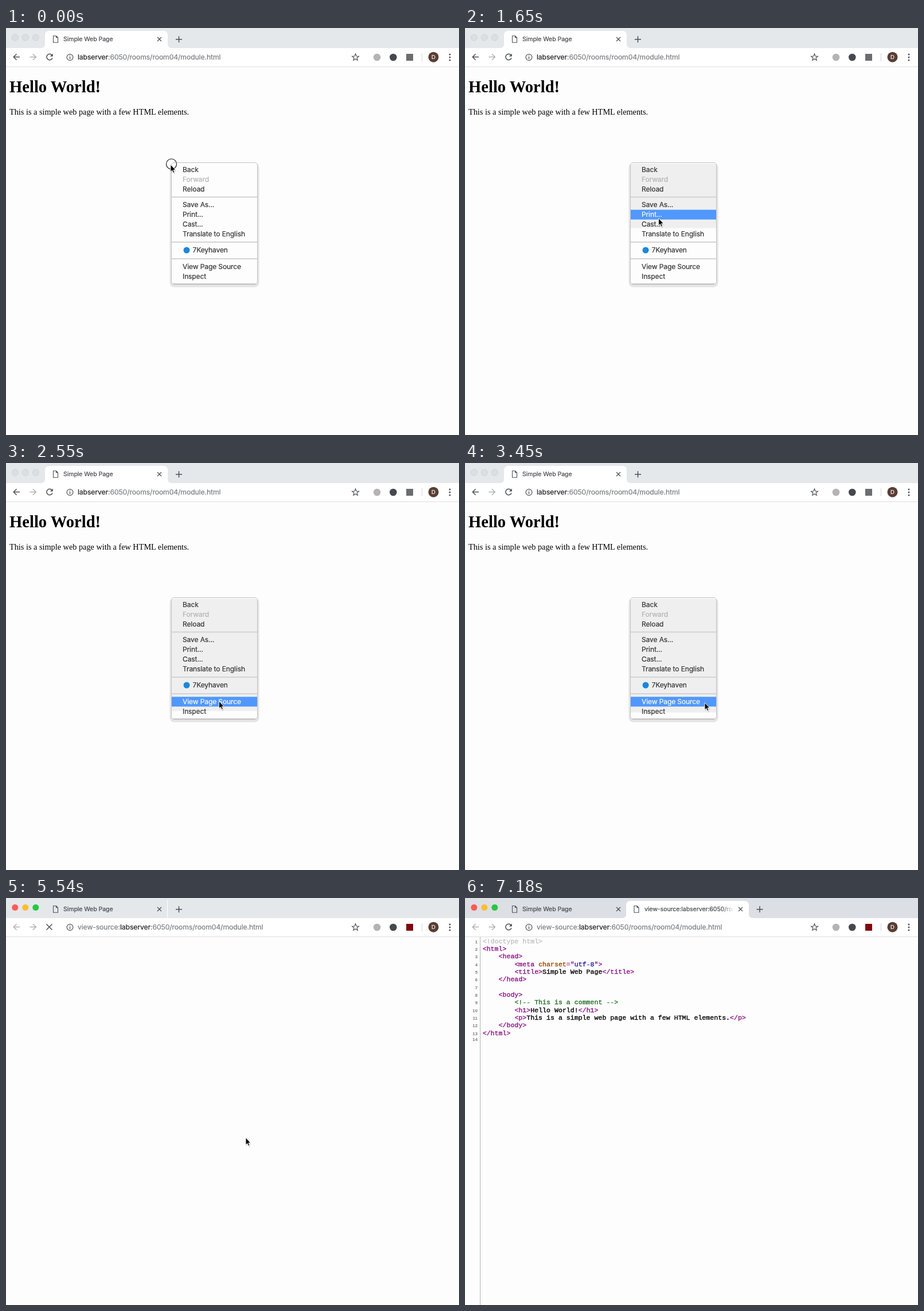
An HTML page that plays this animation: 790 px wide and 709 px high, repeating every 7.78 s.

```html
<!DOCTYPE html>
<html lang="en">
<head>
<meta charset="utf-8">
<title>Viewing the markup of a page</title>
<style>
  html, body { margin: 0; width: 100%; height: 100%; overflow: hidden; background: #fdfdfd; }
  svg { display: block; }
  text { white-space: pre; fill: currentColor; }
  tspan { fill: currentColor; stroke: currentColor; }
  .ui, .code { stroke: currentColor; stroke-width: .2px; }
  .ui { font: 12px Inter, Roboto, sans-serif; letter-spacing: -.008em; color: #333; }
  .tab { font-size: 10.6px; color: #45494d; }
  .url { font-size: 12.2px; color: #777d82; }
  .host { color: #202124; }
  .serif { font-family: "Liberation Serif", serif; }
  .code { font: 11.6px "Liberation Mono", monospace; color: #000; stroke-width: .35px; }
  .num { font: bold 8px "Liberation Sans", sans-serif; color: #808080; text-anchor: end; }
  .line { fill: none; stroke: #4d5156; stroke-width: 1.5; }
  .doctype { color: #c0c0c0; }
  .tag { color: #881280; }
  .attr { color: #994500; }
  .value { color: #1a1aa6; }
  .comment { color: #236e25; }
</style>
</head>
<body>
<svg width="790" height="709" viewBox="0 0 790 709">
  <defs>
    <path id="tab" d="M-7 35Q0 35 0 28V13Q0 5 8 5H206Q214 5 214 13V28Q214 35 221 35Z" fill="#fff"/>
    <path id="file" class="line" style="stroke-width:1.1" d="M.5 .5H5.5L8.5 3.5V12H.5ZM5.5 .5V3.5H8.5"/>
    <path id="close" class="line" style="stroke-width:1.3" d="M-3.5 -3.5L3.5 3.5M3.5 -3.5L-3.5 3.5"/>
    <path id="arrow" class="line" d="M5.5 0H-5M0 -5.3L-5.3 0L0 5.3"/>
    <linearGradient id="fade">
      <stop offset="0" stop-color="#fff" stop-opacity="0"/>
      <stop offset="1" stop-color="#fff"/>
    </linearGradient>
    <clipPath id="title"><path d="M310 8H469V32H310Z"/></clipPath>
  </defs>

  <rect width="790" height="709" fill="#fdfdfd"/>
  <rect id="strip" width="790" height="35"/>
  <rect y="35" width="790" height="32" fill="#fff"/>
  <rect y="67" width="790" height="1" fill="#dcdddf"/>
  <g id="lights"></g>

  <use id="firstTab" href="#tab" x="68"/>
  <use href="#file" x="82" y="13.3"/>
  <text class="ui tab" x="100" y="23.3">Simple Web Page</text>
  <use href="#close" x="267.5" y="19.5"/>
  <path id="divider" d="M281.5 4V35" stroke="#fff"/>
  <g id="secondTab">
    <use href="#tab" x="281"/>
    <use href="#file" x="294.5" y="13.3"/>
    <g clip-path="url(#title)">
      <text class="ui tab" x="313" y="23.3">view-source:labserver:6050/rooms</text>
      <rect x="448" y="8" width="21" height="24" fill="url(#fade)"/>
    </g>
    <use href="#close" x="480.5" y="19.5"/>
  </g>
  <path id="plus" class="line" d="M-5.5 0H5.5M0 -5.5V5.5"/>

  <use id="back" href="#arrow" x="18.5" y="50.5"/>
  <use href="#arrow" transform="translate(47 50.5) scale(-1 1)" opacity=".45"/>
  <g id="reload">
    <path class="line" d="M80.2 47.2A5.2 5.2 0 1 0 81 52.2"/>
    <path d="M81.8 44.5V49.5H76.8Z" fill="#4d5156"/>
  </g>
  <path id="stop" class="line" d="M70.5 45.5L80.5 55.5M80.5 45.5L70.5 55.5"/>
  <circle class="line" style="stroke-width:1.2" cx="111.5" cy="51" r="5.4"/>
  <path class="line" style="stroke-width:1.3" d="M111.5 50V54M111.5 47.7V49"/>
  <text class="ui url" y="55.2" x="125"><tspan id="scheme"></tspan><tspan class="host">labserver</tspan>:6050/rooms/room04/module.html</text>
  <path id="star" class="line" style="stroke-width:1.2"/>
  <circle cx="647" cy="51" r="6.3" fill="#b4b4b4"/>
  <circle cx="675.3" cy="51" r="6.3" fill="#45494d"/>
  <rect id="badge" x="698" y="45" width="12" height="12"/>
  <path d="M725.5 44V58" stroke="#d5d7da"/>
  <circle cx="745.5" cy="50.7" r="9" fill="#5a3d33"/>
  <text class="ui" x="745.5" y="54.2" text-anchor="middle" style="font-size:9.5px;color:#fff">D</text>
  <path d="M774 46v0M774 51v0M774 56v0" stroke="#4d5156" stroke-width="3" stroke-linecap="round"/>

  <g id="page" class="serif">
    <text x="6" y="112" font-size="28.6" font-weight="bold">Hello World!</text>
    <text x="6" y="151" font-size="14.29">This is a simple web page with a few HTML elements.</text>
  </g>
  <g id="markup"></g>

  <g id="menu">
    <rect x="285.5" y="235" width="156" height="216.5" rx="8" fill="#e4e4e4"/>
    <rect x="288.5" y="234.5" width="150" height="211.5" rx="4.5" fill="#fdfdfd" stroke="#c2c2c2"/>
    <path d="M292 446H435" stroke="#a8a8a8"/>
    <rect id="shade" x="289" y="236.5" width="149" fill="#efefef"/>
    <path d="M289 294.5H438M289 373H438M289 402H438" stroke="#d4d4d4" stroke-width="1.8"/>
    <rect id="bar" x="289" width="149" height="17" fill="#5198fc"/>
    <circle cx="315" cy="387" r="5.5" fill="#1c87dc"/>
    <g id="items"></g>
  </g>

  <g id="ring" fill="none">
    <circle r="9" stroke="#fff" stroke-width="2.6" opacity=".6"/>
    <circle r="9" stroke="#111" stroke-width="1.1"/>
  </g>
  <g id="cursor">
    <path d="M1 2V15L4 12.5L6 17L8 16L6 11.8H10Z" fill="#000" opacity=".15"/>
    <path d="M0 0V12.6L2.9 10L4.8 14.5L6.9 13.6L5 9.2H8.8Z" stroke="#fff" stroke-width=".9"/>
  </g>
</svg>

<script>
const $ = id => document.getElementById(id);
const show = (id, on) => $(id).style.display = on ? "" : "none";
const move = (id, x, y) => $(id).setAttribute("transform", `translate(${x} ${y})`);
const span = (cls, s) => `<tspan class="${cls}">${s.replace(/</g, "&lt;")}</tspan>`;
const tag = s => span("tag", s);

// Context menu: label and vertical middle of each row
const items = [
  ["Back", 246.5], ["Forward", 263.5], ["Reload", 280.5],
  ["Save As...", 308], ["Print...", 325], ["Cast...", 342], ["Translate to English", 358.8],
  ["7Keyhaven", 387], ["View Page Source", 415.7], ["Inspect", 432.7]
];
$("items").innerHTML = items.map(([label, y]) =>
  `<text class="ui" x="${label[0] === "7" ? 325.5 : 308}" y="${y + 4.3}">${label}</text>`).join("");
const labels = [...$("items").children];

// Listing: indent and content of each line
const lines = [
  [0, span("doctype", "<!doctype html>")],
  [0, tag("<html>")],
  [4, tag("<head>")],
  [8, tag("<meta ") + span("attr", "charset") + tag('="') + span("value", "utf-8") + tag('">')],
  [8, tag("<title>") + "Simple Web Page" + tag("</title>")],
  [4, tag("</head>")],
  [0, ""],
  [4, tag("<body>")],
  [8, span("comment", "<!-- This is a comment -->")],
  [8, tag("<h1>") + "Hello World!" + tag("</h1>")],
  [8, tag("<p>") + "This is a simple web page with a few HTML elements." + tag("</p>")],
  [4, tag("</body>")],
  [0, tag("</html>")],
  [0, ""]
];
$("markup").innerHTML = '<path d="M26.5 68V709" stroke="#b4b4b4"/>' + lines.map(([indent, s], i) => {
  const y = i < 13 ? 78.6 + i * 13.35 : 248.5;
  return `<text class="num" x="22" y="${y}">${i + 1}</text>
    <text class="code" x="${30.7 + indent * 6.96}" y="${y}">${s}</text>`;
}).join("");

$("lights").innerHTML = [0, 1, 2].map(i => `<circle cx="${15.8 + 18 * i}" cy="16.5" r="5.5"/>`).join("");
const lights = [...$("lights").children];

$("star").setAttribute("d", "M" + [...Array(10).keys()].map(i => {
  const a = i * Math.PI / 5, r = i % 2 ? 2.7 : 6.2;
  return [609.5 + r * Math.sin(a), 51.2 - r * Math.cos(a)];
}).join("L") + "Z");

// Pointer stops: time, x, y
const stops = [[900, 287, 238], [1350, 328, 289.5], [1950, 347, 373.5], [2550, 371.5, 415],
  [3000, 394, 417.5], [3450, 418, 417.5]];
const exits = [[556, 539], [680, 632], [707, 658]];

function pointer(t) {
  if (t >= 6730) return exits[Math.floor((t - 6730) / 150)];
  const q = Math.floor(t / 150) * 150;
  const i = stops.findIndex(s => s[0] > q);
  if (i === 0) return stops[0].slice(1);
  if (i < 0) return stops.at(-1).slice(1);
  const [t0, x0, y0] = stops[i - 1], [t1, x1, y1] = stops[i];
  const k = (q - t0) / (t1 - t0);
  return [x0 + k * (x1 - x0), y0 + k * (y1 - y0)];
}

function drawMenu(t, y) {
  const started = t >= 1050;
  // The highlight trails slightly behind the pointer
  const hot = started ? items.findIndex(([label, mid]) =>
    label !== "Forward" && Math.abs(y - 7 - mid) <= 8.6) : -1;
  $("shade").setAttribute("height", started ? y + 17 - 236.5 : 0);
  show("bar", hot >= 0);
  if (hot >= 0) $("bar").setAttribute("y", items[hot][1] - 8.4);
  labels.forEach((el, i) => el.style.color = i === hot ? "#fff" : i === 1 ? "#b3b3b3" : "");
}

function draw(t) {
  const opened = t >= 5540, tabbed = t >= 5690, loaded = t >= 5840;
  const spot = pointer(t);

  $("strip").setAttribute("fill", tabbed ? "#dcdfe3" : "#e4e8eb");
  lights.forEach((el, i) => {
    el.setAttribute("fill", opened ? ["#fc5b57", "#fdbc2f", "#27c840"][i] : "#dcdfe2");
    el.setAttribute("stroke", opened ? "none" : "#d0d3d6");
  });
  show("firstTab", !opened);
  show("divider", opened && !tabbed);
  show("secondTab", tabbed);
  move("plus", tabbed ? 514 : 301.5, 19.7);
  $("back").setAttribute("opacity", opened ? .45 : 1);
  show("stop", opened && !loaded);
  show("reload", !opened || loaded);
  $("scheme").textContent = opened ? "view-source:" : "";
  $("badge").setAttribute("fill", opened ? "#800610" : "#6b6d70");

  show("page", !opened);
  show("markup", loaded);
  show("menu", t < 5390);
  if (t < 5390) drawMenu(t, spot[1]);

  const late = t >= 5100;
  show("ring", t < 150 || late && t < 5250);
  move("ring", late ? 419.5 : 288.5, late ? 417 : 237);
  show("cursor", spot);
  if (spot) move("cursor", ...spot);
}

const start = performance.now();
function tick() {
  draw((performance.now() - start) % 7780);
  requestAnimationFrame(tick);
}
tick();
</script>
</body>
</html>
```
